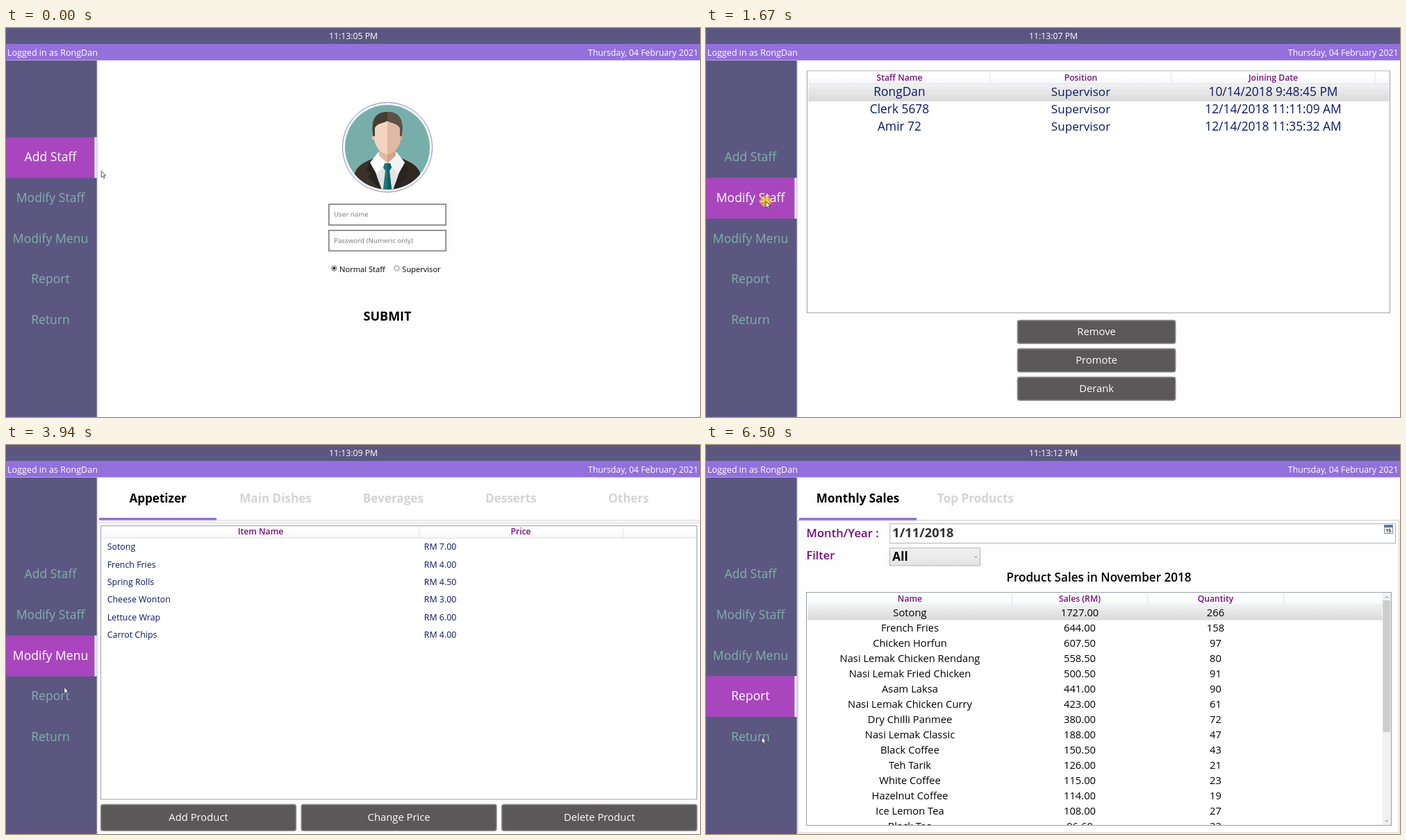
Animation of 999x561 px, one loop 6.57 s. Source, as an HTML page:

```html
<!DOCTYPE html>
<html lang="en">
<head>
<meta charset="utf-8">
<title>Staff console</title>
<style>
html, body { margin: 0; width: 100%; height: 100%; overflow: hidden; background: #fefefe; }
svg { display: block; width: 100vw; height: 100vh; }
text { font-family: "Open Sans", "Noto Sans", sans-serif; white-space: pre; }
</style>
</head>
<body>
<svg id="stage" viewBox="0 0 999 561">
  <defs>
    <linearGradient id="row" x2="0" y2="1"><stop stop-color="#f1f1f1"/><stop offset="1" stop-color="#d9d9d9"/></linearGradient>
    <linearGradient id="head" x2="0" y2="1"><stop offset=".4" stop-color="#fff"/><stop offset="1" stop-color="#f5f6f8"/></linearGradient>
    <linearGradient id="combo" x2="0" y2="1"><stop stop-color="#f0f0f0"/><stop offset="1" stop-color="#e4e4e4"/></linearGradient>
    <clipPath id="disc"><circle cx="549" cy="172" r="61"/></clipPath>
    <clipPath id="rightHalf"><rect x="549" y="100" width="70" height="140"/></clipPath>
    <clipPath id="list"><rect x="145" y="213" width="829" height="335"/></clipPath>
  </defs>
</svg>
<script>
const LOOP = 6570;
const PURPLE = '#9370db', SLATE = '#5b5781', NAVY = '#0a1766', PLUM = '#750f7b', GREY = '#d4d4d4';
const USER = 'RongDan';
const stage = document.getElementById('stage');

function add(parent, tag, attrs, label) {
  const el = document.createElementNS('http://www.w3.org/2000/svg', tag);
  for (const k in attrs) el.setAttribute(k, attrs[k]);
  if (label !== undefined) el.textContent = label;
  parent.appendChild(el);
  return el;
}
const group = (parent, attrs = {}) => add(parent, 'g', attrs);
const text = (g, x, y, label, size, fill, anchor = 'middle', weight = 400) =>
  add(g, 'text', { x, y, 'font-size': size, fill, 'text-anchor': anchor, 'font-weight': weight }, label);
const box = (g, x, y, x2, y2, fill, stroke = 'none', sw = 1, rx = 0) =>
  add(g, 'rect', { x, y, width: x2 - x, height: y2 - y, fill, stroke, 'stroke-width': sw, rx });
const path = (g, d, fill, stroke = 'none', sw = 1) => add(g, 'path', { d, fill, stroke, 'stroke-width': sw });
const circle = (g, cx, cy, r, fill, stroke = 'none', sw = 1) =>
  add(g, 'circle', { cx, cy, r, fill, stroke, 'stroke-width': sw });

function button(g, x, y, x2, y2, label) {
  box(g, x, y, x2, y2, '#5a5858', '#8a8a8a', 1.6, 3);
  text(g, (x + x2) / 2, (y + y2) / 2 + 5, label, 14.8, '#fff');
}

function table(g, x, y, x2, y2, headY, seps, heads) {
  box(g, x, y, x2, y2, '#fff', '#9a9fa6');
  box(g, x + 1, y + .5, x2 - 1, headY, 'url(#head)');
  path(g, `M${x + 1} ${headY}H${x2 - 1}` + seps.map(s => `M${s} ${y + 1}V${headY}`).join(''), 'none', '#dfe2e8');
  for (const [cx, label] of heads) text(g, cx, headY - 4.9, label, 12.2, PLUM, 'middle', 600);
}

function tabs(g, labels) {
  labels.forEach((label, i) =>
    text(g, 218.6 + 169.4 * i, 83, label, 17.1, i ? GREY : '#000', 'middle', 700));
  box(g, 134, 105, 303, 108.6, PURPLE);
}

// Header bars and side menu
box(stage, 0, 0, 999, 23, SLATE);
box(stage, 0, 23, 999, 46.5, PURPLE);
box(stage, 0, 46, 999, 47, '#b9a5e6');
const clock = text(stage, 500, 16, '', 12.25, '#fff');
text(stage, 2, 40, 'Logged in as ' + USER, 12.55, '#fff', 'start');
text(stage, 996.5, 40, 'Thursday, 04 February 2021', 12.28, '#fff', 'end');
box(stage, 0, 47, 131, 561, SLATE);
box(stage, 130.6, 47, 131.6, 561, '#c3c1d2');
const active = group(stage);
box(active, .5, 158, 127.5, 216, '#a946bd', '#9a4bb4');
box(active, 127.5, 157.5, 130.6, 216.3, '#fff');
const items = ['Add Staff', 'Modify Staff', 'Modify Menu', 'Report', 'Return']
  .map((label, i) => text(stage, 64, 192.3 + 58.6 * i, label, 17.6, ''));

const pages = [addPage, staffPage, menuPage, reportPage].map(draw => {
  const g = group(stage);
  draw(g);
  return g;
});

function avatar(g) {
  circle(g, 549, 172, 64.8, '#f1f3f6', '#8a93b5', 1);
  circle(g, 549, 172, 61, '#78aeaa');
  const a = group(g, { 'clip-path': 'url(#disc)' });
  const shaded = (d, light, dark) => {
    path(a, d, light);
    path(a, d, dark).setAttribute('clip-path', 'url(#rightHalf)');
  };
  shaded('M499 240C499 202 503 199 533 186H565C595 199 599 202 599 240Z', '#3a312b', '#2f2823');
  path(a, 'M527 190L541 240H557L571 190Z', '#e2e3e3');
  path(a, 'M524 191L518 205L526 209L521 214L542 236L527 196ZM574 191L580 205L572 209L577 214L556 236L571 196Z', '#292320');
  shaded('M536 179L524 194L533 210L549 195L565 210L574 194L562 179Z', '#fff', '#f3f3f3');
  shaded('M537 165H561V184L549 195L537 184Z', '#e2b9a1', '#d0a58c');
  shaded('M545 195H553L555 201L552 206L556 240H542L546 206L543 201Z', '#1b7a79', '#0f6264');
  circle(a, 530, 158, 3.5, '#e8c3ad');
  circle(a, 568, 158, 3.5, '#d0a58c');
  shaded('M530 138V160C531 172 541 182 549 182C557 182 567 172 568 160V138C560 131 538 131 530 138Z', '#f4d3c0', '#dfb9a3');
  shaded('M528.5 156C525 134 530 121 549 121C568 121 573 134 569.5 156L567 156V144C563 137 556 138 549 134C542 138 535 137 531 144V156Z', '#463e35', '#5b5144');
}

function addPage(g) {
  avatar(g);
  box(g, 464.8, 254.2, 633.2, 284.2, '#fff', '#7b7b7b', 1.6);
  box(g, 464.8, 291.8, 633.2, 321.4, '#fff', '#7b7b7b', 1.6);
  text(g, 472, 272.4, 'User name', 9.75, '#767676', 'start');
  text(g, 472, 310, 'Password (Numeric only)', 9.82, '#767676', 'start');
  circle(g, 472.3, 346.6, 3.7, '#fff', '#555', .9);
  circle(g, 472.3, 346.6, 2.1, '#222');
  circle(g, 562.5, 346.6, 3.7, '#fff', '#777', .9);
  text(g, 480, 351.6, 'Normal Staff', 11.15, '#000', 'start');
  text(g, 570.3, 351.6, 'Supervisor', 11.1, '#000', 'start');
  text(g, 549, 422.3, 'SUBMIT', 18, '#000', 'middle', 700);
}

function staffPage(g) {
  const cols = [278.5, 539.5, 816.5];
  table(g, 145.5, 62, 984.5, 410.8, 80.4, [409, 669.7, 963],
    [[cols[0], 'Staff Name'], [cols[1], 'Position'], [cols[2], 'Joining Date']]);
  box(g, 147, 81, 983.5, 105.6, 'url(#row)');
  [[USER, '10/14/2018 9:48:45 PM'],
   ['Clerk 5678', '12/14/2018 11:11:09 AM'],
   ['Amir 72', '12/14/2018 11:35:32 AM']].forEach(([name, date], i) =>
    [name, 'Supervisor', date].forEach((s, c) =>
      text(g, cols[c], 98.4 + 25 * i, s, c === 1 ? 17.1 : 17.35, NAVY)));
  ['Remove', 'Promote', 'Derank'].forEach((s, i) =>
    button(g, 448.5, 421.6 + 41 * i, 675.7, 455 + 41 * i, s));
}

function menuPage(g) {
  tabs(g, ['Appetizer', 'Main Dishes', 'Beverages', 'Desserts', 'Others']);
  path(g, 'M303 108.5H997.5V112.2H132.5', 'none', '#d5d5da');
  table(g, 136.5, 116.5, 994.5, 511, 134.2, [594.8, 888], [[366.5, 'Item Name'], [741, 'Price']]);
  [['Sotong', '7.00'], ['French Fries', '4.00'], ['Spring Rolls', '4.50'],
   ['Cheese Wonton', '3.00'], ['Lettuce Wrap', '6.00'], ['Carrot Chips', '4.00']].forEach(([name, price], i) => {
    const y = 151.2 + 25.4 * i;
    text(g, 145.7, y, name, 12.4, NAVY, 'start');
    text(g, 601.8, y, 'RM ' + price, 12.4, NAVY, 'start');
  });
  ['Add Product', 'Change Price', 'Delete Product'].forEach((s, i) =>
    button(g, 136.6 + 288.6 * i, 518.5, 417.4 + 288.6 * i, 556.2, s));
}

function reportPage(g) {
  box(g, 132.5, 108.5, 997.5, 559.5, 'none', '#cdcdd2');
  tabs(g, ['Monthly Sales', 'Top Products']);
  text(g, 144.5, 133.2, 'Month/Year :', 16.7, PLUM, 'start', 600);
  text(g, 144.5, 165, 'Filter', 16.4, PLUM, 'start', 600);
  box(g, 264.8, 113.6, 992.5, 141.5, '#fff', '#adb0b6');
  text(g, 268.3, 132.8, '1/11/2018', 18.3, '#333', 'start', 700);
  box(g, 976.5, 115.5, 988.5, 127.5, '#f4f6f9', '#7d8ca3');
  box(g, 976.5, 115.5, 988.5, 119, '#56759f');
  text(g, 982.5, 126.3, '15', 7, '#333', 'middle', 700);
  box(g, 264.5, 148.5, 394.5, 174, 'url(#combo)', '#b3b3b3');
  text(g, 268.3, 167, 'All', 17.2, '#000', 'start', 700);
  path(g, 'M386.5 160.3L388.3 162L390.1 160.3', 'none', '#666', .9);
  text(g, 565.5, 197, 'Product Sales in November 2018', 17.1, '#000', 'middle', 600);

  const cols = [293.5, 538, 733.5];
  table(g, 144.5, 212.5, 986.5, 548.5, 231, [440.3, 635.8, 831.5],
    [[cols[0], 'Name'], [cols[1], 'Sales (RM)'], [cols[2], 'Quantity']]);
  box(g, 146, 231.4, 973.5, 252.5, 'url(#row)');
  const rows = group(g, { 'clip-path': 'url(#list)' });
  ['Sotong|1727.00|266', 'French Fries|644.00|158', 'Chicken Horfun|607.50|97',
   'Nasi Lemak Chicken Rendang|558.50|80', 'Nasi Lemak Fried Chicken|500.50|91',
   'Asam Laksa|441.00|90', 'Nasi Lemak Chicken Curry|423.00|61', 'Dry Chilli Panmee|380.00|72',
   'Nasi Lemak Classic|188.00|47', 'Black Coffee|150.50|43', 'Teh Tarik|126.00|21',
   'White Coffee|115.00|23', 'Hazelnut Coffee|114.00|19', 'Ice Lemon Tea|108.00|27',
   'Black Tea|96.60|32'].forEach((r, i) => r.split('|').forEach((s, c) =>
      text(rows, cols[c], 246.7 + 22.02 * i, s, 14.75, '#000')));
  box(g, 974, 213, 986, 548, '#f0f0f0');
  box(g, 974.3, 224, 985, 414, '#cdcdcd');
  path(g, 'M977.6 220.5L979.7 218.4L981.8 220.5M977.6 541L979.7 543.1L981.8 541', 'none', '#777', 1);
}

// Pointer
const pointer = group(stage);
const ring = circle(pointer, 0, 0, 8, 'rgba(255,225,0,.6)');
path(pointer, 'M.2 .2V9.2L2.2 7.4L3.7 10.6L5.2 9.9L3.8 6.8H6.6Z', '#fff', '#2b2b35', .8);

// start, end, number of steps, x, y reached
const MOVES = [
  [470, 1100, 8, 88, 260], [1170, 1240, 2, 86, 260], [1420, 1490, 2, 86, 250],
  [2030, 2240, 4, 83, 302], [3110, 3550, 8, 77, 360], [3870, 3940, 2, 83.5, 349],
  [4440, 4870, 7, 79.5, 421], [5820, 5820, 1, 80, 421]
];
const PAGE_AT = [0, 1670, 2800, 4320];
const CLICKS = [[1670, 1720], [2740, 2860], [4320, 4370]];
const TICKS = [0, 490, 1490, 2540, 3490, 4500, 5500, 6500];

const lastIndex = (times, t) => times.filter(s => s <= t).length - 1;

function pointerAt(t) {
  let x = 137, y = 206;
  for (const [t0, t1, n, nx, ny] of MOVES) {
    if (t < t0) break;
    const done = t >= t1 ? n : 1 + Math.floor((t - t0) / (t1 - t0) * (n - 1));
    const p = done / n, e = p * p * (3 - 2 * p);
    x += (nx - x) * e;
    y += (ny - y) * e;
  }
  return [x, y];
}

function render(t) {
  const page = lastIndex(PAGE_AT, t);
  pages.forEach((g, i) => g.setAttribute('visibility', i === page ? 'visible' : 'hidden'));
  items.forEach((el, i) => el.setAttribute('fill', i === page ? '#fff' : '#82b0aa'));
  active.setAttribute('transform', `translate(0 ${58.6 * page})`);
  clock.textContent = `11:13:${String(5 + lastIndex(TICKS, t)).padStart(2, '0')} PM`;
  ring.setAttribute('visibility', CLICKS.some(([a, b]) => t >= a && t < b) ? 'visible' : 'hidden');
  pointer.setAttribute('transform', `translate(${pointerAt(t).join(' ')})`);
}

const start = performance.now();
function frame() {
  render((performance.now() - start) % LOOP);
  requestAnimationFrame(frame);
}
frame();
</script>
</body>
</html>
```
